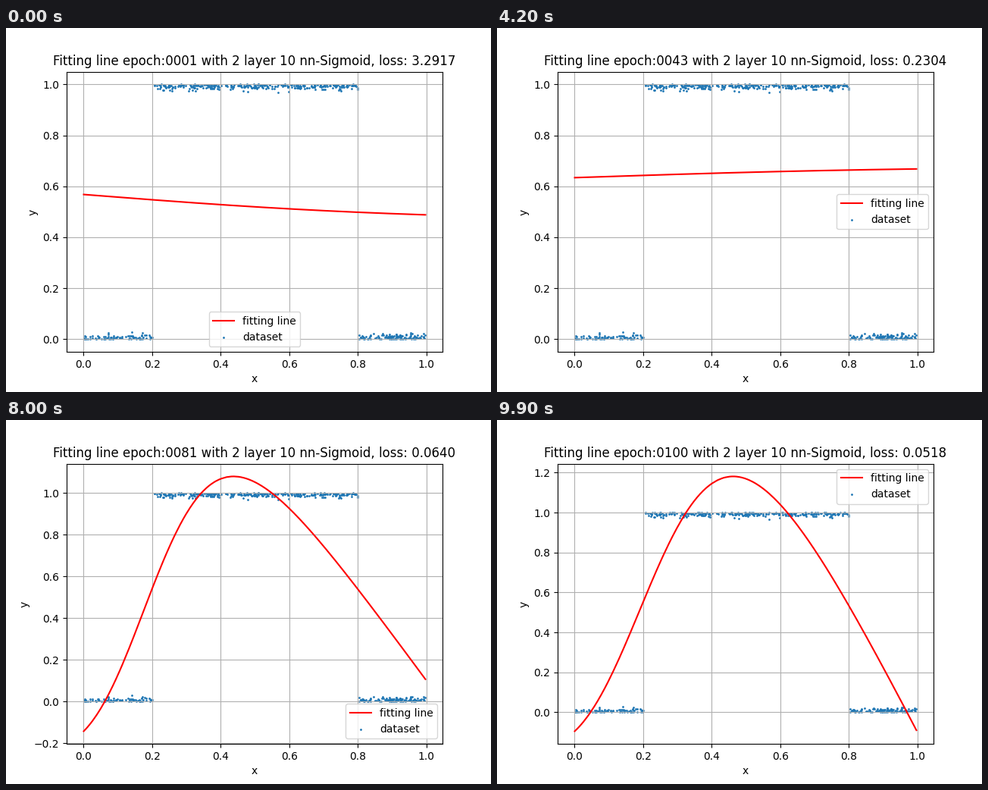
A matplotlib script that plays this animation: 640 by 480 pixels, repeating every 10000 ms.

```python
import numpy as np
import matplotlib.pyplot as plt
from matplotlib.animation import FuncAnimation

EPOCHS = 100

# Key poses: epoch, height at x=0, rise, steepness, centre, linear fall, loss
POSES = np.array([
    (1, .568, -.21, 2, 0, 0, .2417),
    (10, .607, .035, 2, 0, 0, .2310),
    (29, .622, .05, 2, 0, 0, .2302),
    (43, .634, .09, 2, 0, 0, .2304),
    (61, .622, .165, 4, 0, 0, .2269),
    (74, .222, .96, 8, .07, .12, .1805),
    (81, -.143, 3.05, 8.6, .175, 2.25, .0640),
    (86, -.131, 3.27, 9.1, .195, 2.695, .0546),
    (100, -.096, 4.3, 7, .19, 3.39, .0518),
])


def make_data(n=500):
    rng = np.random.default_rng(4)
    x = np.sort(rng.uniform(.0005, .997, n))
    x[0], x[-1] = .0005, .997
    noise = np.abs(rng.normal(0, .01, n))
    return x, np.where((x > .2) & (x < .8), 1 - noise, noise)


def pose_at(epoch):
    """Monotone cubic interpolation between the key poses."""
    keys, rows = POSES[:, 0], POSES[:, 1:]
    d = np.diff(rows, axis=0) / np.diff(keys)[:, None]
    a, b = d[:-1], d[1:]
    same = a * b > 0
    m = np.zeros_like(rows)
    m[1:-1][same] = 2 * a[same] * b[same] / (a + b)[same]
    m[0], m[-1] = d[0], d[-1]
    k = min(np.searchsorted(keys, epoch, side="right") - 1, len(keys) - 2)
    w = keys[k + 1] - keys[k]
    u = (epoch - keys[k]) / w
    ease = u * u * (3 - 2 * u)
    return (rows[k] + ease * (rows[k + 1] - rows[k])
            + w * u * (1 - u) * ((1 - u) * m[k] - u * m[k + 1]))


def sigmoid(z):
    return 1 / (1 + np.exp(-z))


def curve(x, start, rise, steep, centre, fall):
    bend = sigmoid(steep * (x - centre)) - sigmoid(-steep * centre)
    return start + rise * bend - fall * x


x, y = make_data()
fig, ax = plt.subplots(figsize=(6.4, 4.8), dpi=100)


def draw(i):
    epoch = i + 1
    *shape, loss = pose_at(epoch)
    loss += 3.05 * np.exp(-3 * i)
    ax.clear()
    ax.plot(x, curve(x, *shape), "r", label="fitting line")
    ax.scatter(x, y, s=1, label="dataset")
    ax.set_title(f"Fitting line epoch:{epoch:04d} with 2 layer 10 nn-Sigmoid, "
                 f"loss: {loss:.4f}")
    ax.set_xlabel("x")
    ax.set_ylabel("y")
    ax.grid(True)
    ax.legend(loc="best")


anim = FuncAnimation(fig, draw, frames=EPOCHS, interval=100, repeat=True)
plt.show()
```
